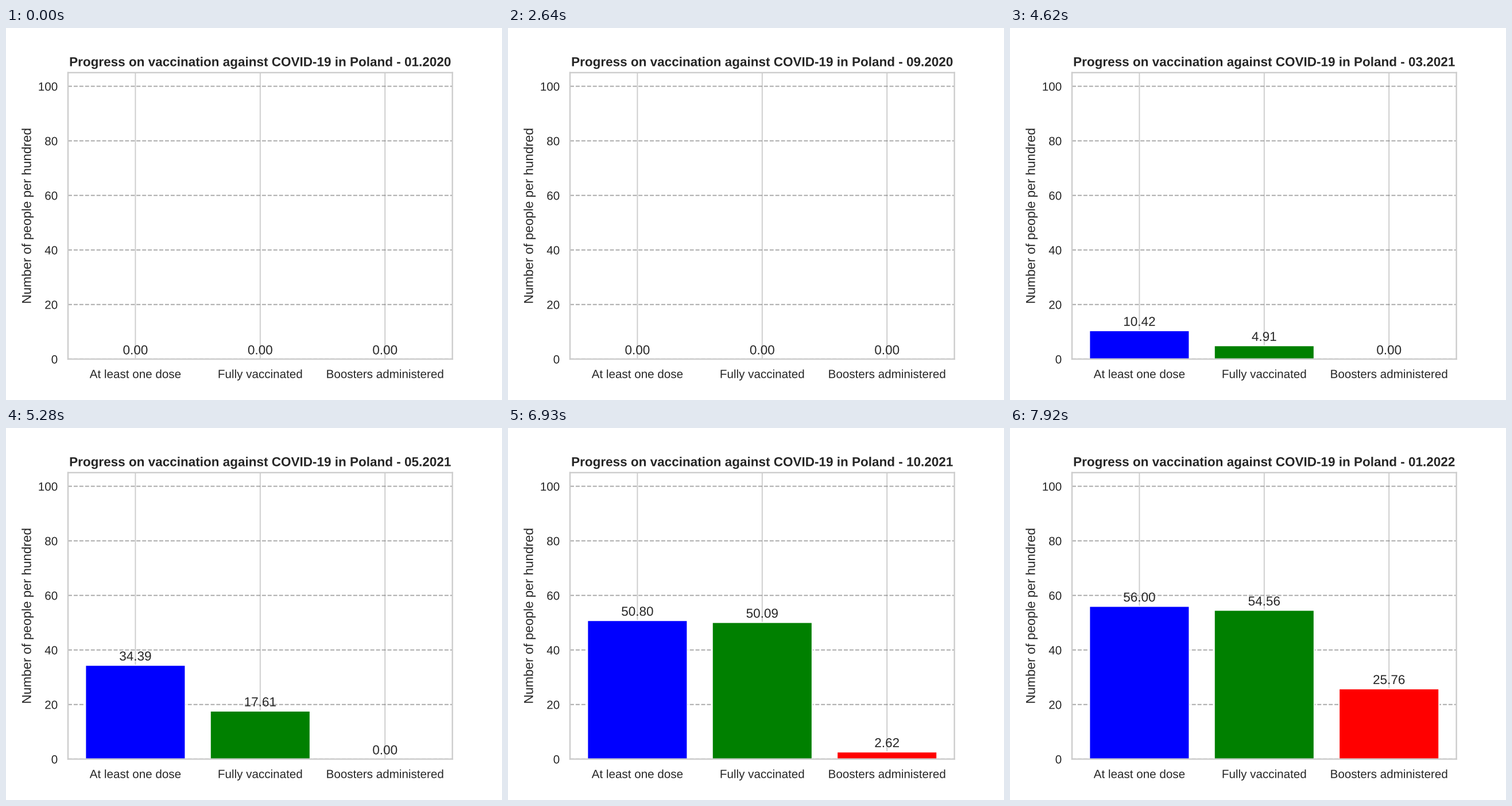
A matplotlib script that plays this animation: 864x648 px, repeating every 8 s.

```python
import matplotlib.pyplot as plt
import numpy as np
from matplotlib.animation import FuncAnimation
from matplotlib.patheffects import Normal
from matplotlib.text import Text

STEP_MS = 330      # time each month is shown
TICK_MS = 40
LOOP_MS = 8000
LABEL_GAP = 1.75
INK = "0.15"

# name, colour, key points (months since January 2020, people per hundred)
SERIES = [
    ("At least one dose", "blue",
     [(10, 0), (11, 0.12), (12, 2.45), (14, 10.42), (16, 34.39),
      (17, 43.05), (19, 48.38), (21, 50.80), (24, 56.00)]),
    ("Fully vaccinated", "green",
     [(11, 0), (12, 0.50), (15, 7.12), (16, 17.61),
      (18, 43.92), (19, 47.14), (21, 50.09), (24, 54.56)]),
    ("Boosters administered", "red",
     [(20, 0), (21, 2.62), (22, 7.10), (24, 25.76)]),
]
names, colors, curves = zip(*SERIES)

plt.rcParams.update({
    "font.family": "Liberation Sans",
    "font.size": 12,
    "text.color": INK,
    "text.hinting": "no_hinting",
    "axes.labelcolor": INK,
    "axes.labelsize": 12,
    "axes.titlesize": 12,
    "axes.titleweight": "bold",
    "axes.edgecolor": "0.8",
    "axes.linewidth": 1.25,
    "axes.axisbelow": True,
    "grid.linewidth": 1,
    "xtick.labelsize": 11,
    "ytick.labelsize": 11,
    "xtick.color": INK,
    "ytick.color": INK,
    "xtick.bottom": False,
    "ytick.left": False,
    "xtick.major.size": 6,
    "ytick.major.size": 6,
})

fig, ax = plt.subplots(figsize=(6.4, 4.8), dpi=135)
ax.set_ylabel("Number of people per hundred")
ax.grid(axis="x", color="0.8")
ax.grid(axis="y", color="gray", linestyle="--", alpha=0.7)

bars = ax.bar(names, 0, color=colors, edgecolor="white", linewidth=1)
ax.set_xlim(-0.54, 2.54)
ax.set_ylim(0, 105)
labels = [ax.text(x, LABEL_GAP, "", ha="center") for x in range(len(names))]
title = ax.set_title("")

# smooth outlines: no pixel snapping, text drawn as vector shapes
fig.canvas.draw()
for part in [*ax.get_xgridlines(), *ax.get_ygridlines(),
             *ax.spines.values(), *bars]:
    part.set_snap(False)
for text in fig.findobj(Text):
    text.set_path_effects([Normal()])


def draw(frame):
    month = (frame * TICK_MS + TICK_MS - 10) // STEP_MS
    date = f"{month % 12 + 1:02d}.{2020 + month // 12}"
    title.set_text(f"Progress on vaccination against COVID-19 in Poland - {date}")
    for bar, label, points in zip(bars, labels, curves):
        value = np.interp(month, *zip(*points))
        bar.set_height(value)
        label.set_y(value + LABEL_GAP)
        label.set_text(f"{value:.2f}")
    return [title, *bars, *labels]


anim = FuncAnimation(fig, draw, frames=LOOP_MS // TICK_MS, interval=TICK_MS,
                     init_func=lambda: draw(0), repeat=True, repeat_delay=0)
plt.show()
```
